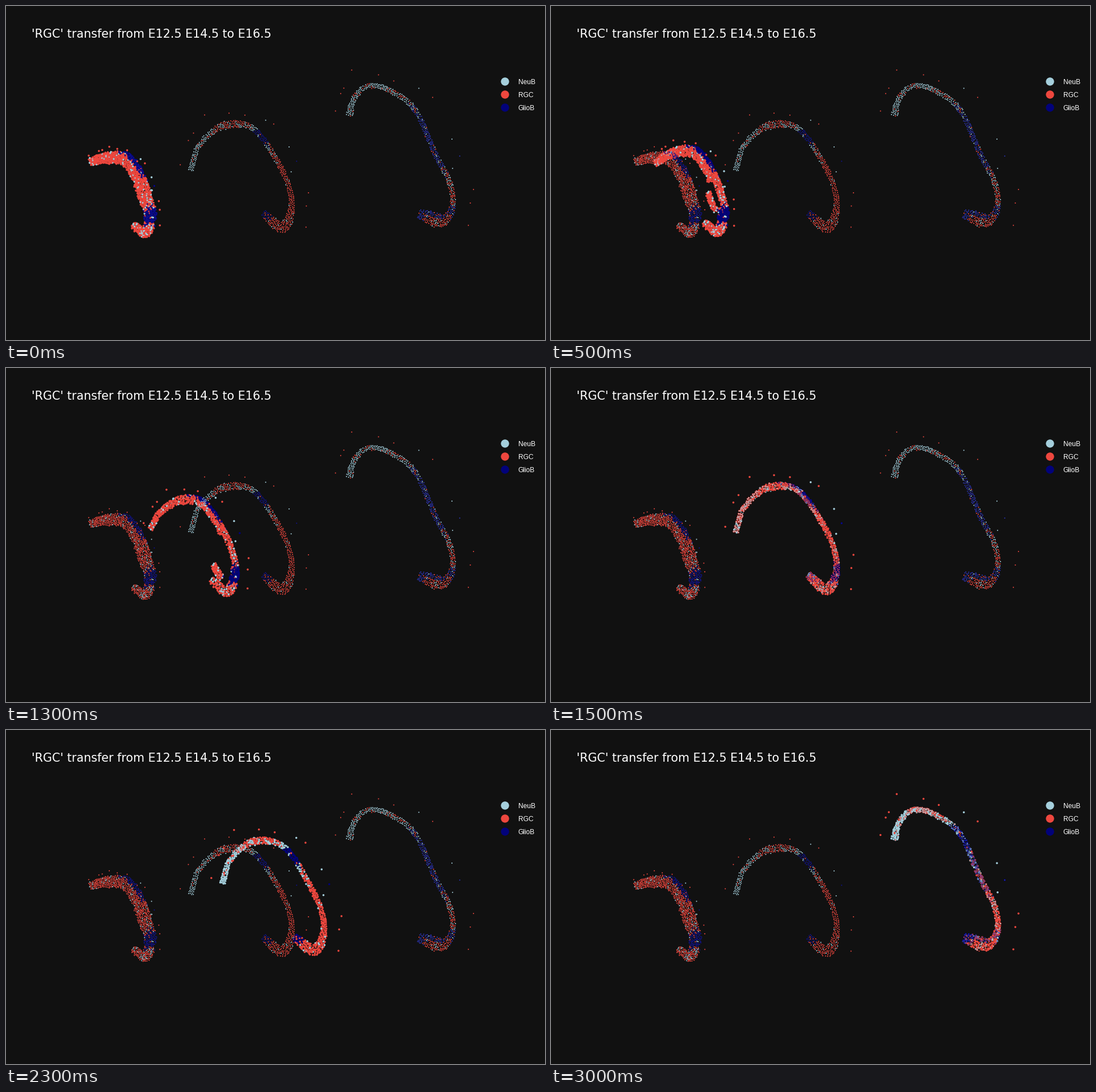
A matplotlib script that plays this animation: 950x590 px, repeating every 3.5 s.

```python
import numpy as np
import matplotlib.pyplot as plt
from matplotlib.animation import FuncAnimation

W, H, DPI = 950, 590, 100
PX = 72 / DPI
BG, WHITE = "#111111", "#ffffff"
PALETTE = np.array(["#a5cfdc", "#ee473e", "#02027a"])
NEU, RGC, GLIO = range(3)
STATIC_SIZE, MOVING_SIZE = 2.0, 3.5
rng = np.random.default_rng(12)


def bump(s, centre, spread):
    return np.exp(-((s - centre) / spread) ** 2)


class Tissue:
    """A curved band of cells; s runs along it, v across it from -1 to 1."""

    def __init__(self, line, width, gap, neu, blue, blue_tone, reach):
        self.line = np.array(line, float)
        self.last = len(line) - 1
        self.width = width
        self.blue_tone = blue_tone
        self.fill(gap)
        self.kind = self.types(neu, blue)
        self.lone = self.place(STRAY_S, 1, STRAY_GAP * reach)
        self.pos = np.vstack([self.body, self.lone])
        self.kind = np.append(self.kind, STRAY_KIND)

    def place(self, s, v, away=0):
        """Pixels on a Catmull-Rom curve, moved along its normal."""
        p = self.line
        p = np.vstack([2 * p[0] - p[1], p, 2 * p[-1] - p[-2]])
        i = np.clip(s.astype(int), 0, self.last - 1)
        t = (s - i)[:, None]
        a, b, c, d = (p[i + k] for k in range(4))
        k1, k2, k3 = c - a, 2 * a - 5 * b + 4 * c - d, 3 * b - a - 3 * c + d
        pos = b + (k1 * t + k2 * t**2 + k3 * t**3) / 2
        slope = k1 + 2 * k2 * t + 3 * k3 * t**2
        slope /= np.linalg.norm(slope, axis=1, keepdims=True)
        normal = np.column_stack([slope[:, 1], -slope[:, 0]])
        return pos + normal * (self.width(s) * v + away)[:, None]

    def fill(self, gap, tries=6000):
        """Scatter cells at least `gap` pixels apart, with ragged edges."""
        s = rng.uniform(0, self.last, tries)
        v = rng.uniform(-.95, .95, tries) + rng.normal(0, .08, tries)
        cand = self.place(s, v)
        chosen = [0]
        for j in range(1, tries):
            if ((cand[chosen] - cand[j]) ** 2).sum(axis=1).min() > gap * gap:
                chosen.append(j)
        self.s, self.v, self.body = s[chosen], v[chosen], cand[chosen]

    def types(self, neu, blue):
        """Share of NeuB along the band, with patches of GlioB."""
        share = np.interp(self.s, *neu)
        kind = np.where(rng.random(len(self.s)) < share, NEU, RGC)
        for centre, spread, side in blue:
            chance = .85 * np.exp(-((self.s - centre) / spread) ** 4)
            chance *= side * self.v >= .3 * abs(side)
            kind[rng.random(len(self.s)) < chance] = GLIO
        return kind


# Stray cells keep their place along the band and their distance from it.
STRAY_S = np.linspace(.2, 7.5, 14) + rng.uniform(-.2, .2, 14)
STRAY_GAP = rng.uniform(.25, 1, 14)
STRAY_KIND = rng.choice([NEU, RGC, GLIO], 14, p=[.15, .75, .1])

first = Tissue(
    [(147, 276), (168, 270), (188, 268), (210, 270), (227, 290),
     (238, 314), (246, 340), (254, 370), (246, 400), (223, 386)],
    lambda s: 5 + 7 * np.sin(np.pi * np.clip(s / 9, 0, 1)) ** .6,
    gap=1.8, neu=([0, .7, 6.5, 8, 9], [.3, .11, .11, .35, .25]),
    blue=[(3.7, 1, 1), (7, .5, 0)], blue_tone="#10128f", reach=10)
second = Tissue(
    [(325, 291), (341, 246), (378, 213), (422, 210), (449, 230),
     (476, 271), (498, 316), (503, 362), (486, 391), (453, 365)],
    lambda s: 4.5 + 2.5 * bump(s, 2.4, .6) + 5.5 * bump(s, 8, .8),
    gap=2.3, neu=([0, 1.4, 2, 2.8, 3.4, 4.8, 5.2], [.85, .8, .42, .42, .7, .45, .05]),
    blue=[(3.95, .4, 0), (9, .35, 0)], blue_tone="#10128f", reach=28)
third = Tissue(
    [(605, 194), (613, 165), (638, 141), (680, 151), (722, 185),
     (756, 260), (782, 312), (787, 355), (768, 379), (728, 366)],
    lambda s: 4.5 + 1.5 * bump(s, 0, .5) + 7.5 * bump(s, 8.3, .8),
    gap=2.2, neu=([0, 2, 3.5, 6.5, 7.3, 9], [.9, .75, .7, .5, .2, .12]),
    blue=[(4.75, .8, 0), (7.2, .3, 0), (8.3, .8, -1), (9, .25, 0)],
    blue_tone="#2c34b4", reach=35)


def arrivals(src, dst, s, v):
    """Each cell lands on the nearest cell to its matching place."""
    goal = dst.place(s, v)
    d = ((goal[:, None] - dst.body[None]) ** 2).sum(axis=2)
    return np.vstack([dst.body[d.argmin(axis=1)], dst.lone])


def split_arm(s, v):
    """The inner edge of the arm folds over to the tip of the hook."""
    arm = (s > 5.1) & (s < 6.6)
    inner = arm & (v < -.2)
    new_s = np.where(inner, 9 - (s - 5.1) / 3, s)
    new_v = np.where(inner, -(v + .6) * 2.5, np.where(arm, (v - .4) / .6, v))
    return new_s, new_v


legs = [(first, arrivals(first, second, *split_arm(first.s, first.v))),
        (second, arrivals(second, third, second.s, second.v))]
STEPS = [(0, 0)] + [(leg, t) for leg in (0, 1) for t in (.2, .6, 1)]

fig = plt.figure(figsize=(W / DPI, H / DPI), dpi=DPI, facecolor=BG)
ax = fig.add_axes([0, 0, 1, 1])
ax.set_xlim(0, W)
ax.set_ylim(H, 0)
ax.axis("off")


def dots(pos, colors, size, z):
    return ax.scatter(pos[:, 0], pos[:, 1], s=(size * PX) ** 2, c=colors,
                      linewidths=0, zorder=z)


def label(x, y, text, font, size):
    ax.text(x, y, text, color=WHITE, family=font, size=size * PX,
            va="baseline")


for tissue in (first, second, third):
    tones = PALETTE.copy()
    tones[GLIO] = tissue.blue_tone
    dots(tissue.pos, tones[tissue.kind], STATIC_SIZE, 3)
movers = [dots(src.pos, PALETTE[src.kind], MOVING_SIZE, 2) for src, _ in legs]

label(45, 56, "'RGC' transfer from E12.5 E14.5 to E16.5", "DejaVu Sans", 20.7)
for row, name in enumerate(("NeuB", "RGC", "GlioB")):
    y = 133 + 23 * row
    dots(np.array([[879, y]]), [PALETTE[row]], 14.4, 3)
    label(902.5, y + 5, name, "Liberation Sans", 12)


def update(i):
    leg, t = STEPS[i]
    for k, (mover, (src, goal)) in enumerate(zip(movers, legs)):
        mover.set_visible(k == leg)
        mover.set_offsets(src.pos + t * (goal - src.pos))
    return movers


anim = FuncAnimation(fig, update, frames=len(STEPS), interval=500,
                     repeat=True, repeat_delay=0, blit=False)
plt.show()
```
